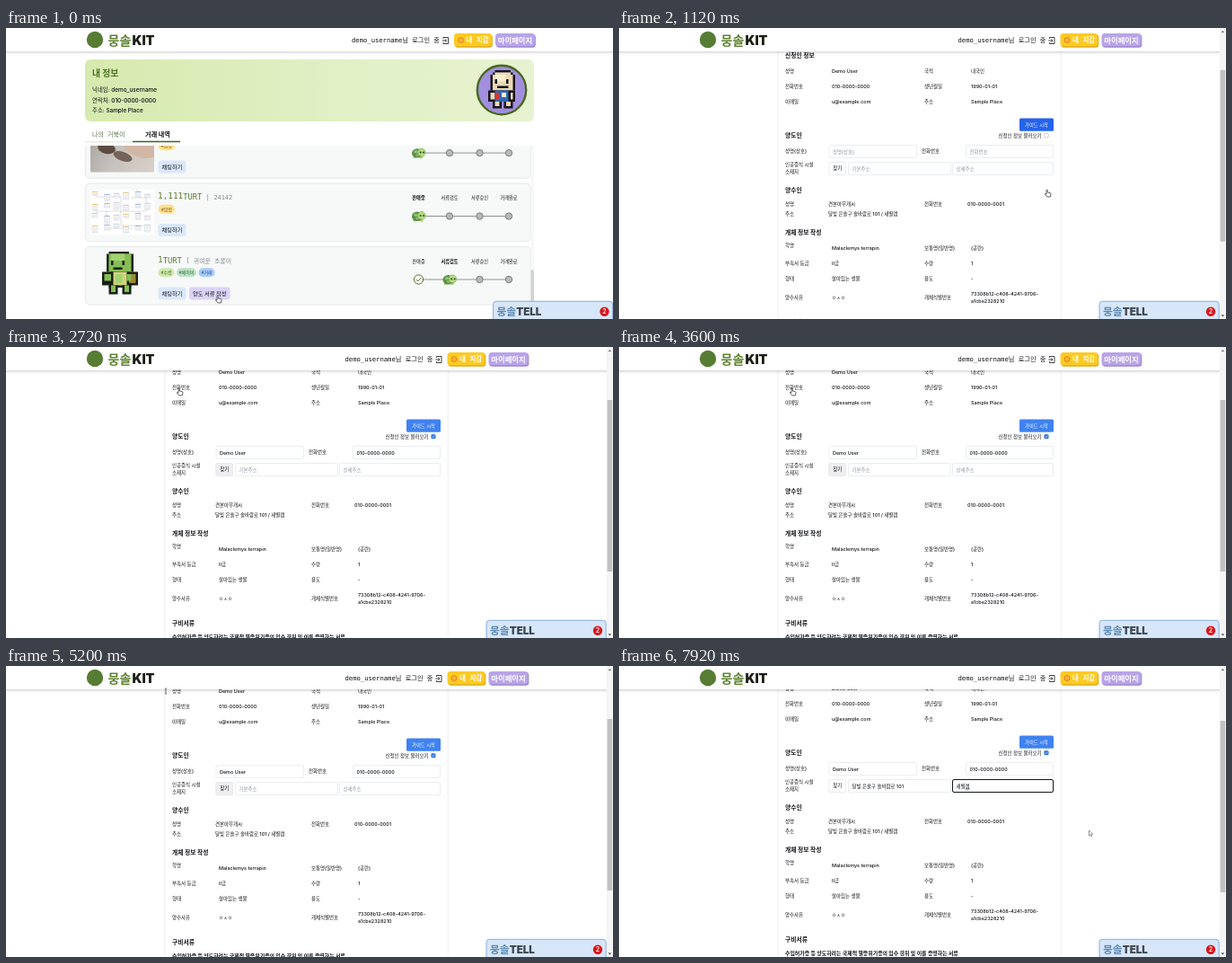
An HTML page with a canvas that plays this animation: 676 by 324 pixels, repeating every 8000 ms.

```html
<!DOCTYPE html>
<html lang="ko">
<head>
<meta charset="utf-8">
<style>
html, body { margin: 0; width: 100%; height: 100%; overflow: hidden; background: #fff; }
canvas { display: block; width: 676px; height: 324px; }
</style>
</head>
<body>
<canvas id="stage"></canvas>
<script>
const W = 676, H = 324, LOOP = 8000;
const canvas = document.getElementById('stage');
const ratio = window.devicePixelRatio || 1;
canvas.width = W * ratio;
canvas.height = H * ratio;
const c = canvas.getContext('2d');

const SANS = 'Inter, "Noto Sans CJK KR", "Noto Sans CJK", sans-serif';
const MONO = '"DejaVu Sans Mono", "Noto Sans CJK KR", "Noto Sans CJK", monospace';
const INK = '#101216', FAINT = '#8d949e', GREEN = '#486f20';

const USER = 'demo_username';
const PHONE = '010-0000-0000';
const PLACE = 'Sample Place';
const PERSON = 'Demo User';
const ADDRESS = '달빛 은솔구 솔바람로 101';
const CAMP = '새별캠';
const TYPED = ['', 'ㅅ', '새', '샙', '새벼', '새별', '새별ㅋ', '새별캐', CAMP];

// Drawing helpers
function box(x, y, w, h, fill, r = 0, stroke, line = 0.7) {
  c.beginPath();
  c.roundRect(x, y, w, h, r);
  if (fill) { c.fillStyle = fill; c.fill(); }
  if (stroke) { c.strokeStyle = stroke; c.lineWidth = line; c.stroke(); }
}
function oval(x, y, rx, ry, fill, turn = 0) {
  c.beginPath();
  c.ellipse(x, y, rx, ry, turn, 0, Math.PI * 2);
  c.fillStyle = fill;
  c.fill();
}
function disc(x, y, r, fill, stroke, line = 0.8) {
  c.beginPath();
  c.arc(x, y, r, 0, Math.PI * 2);
  if (fill) { c.fillStyle = fill; c.fill(); }
  if (stroke) { c.strokeStyle = stroke; c.lineWidth = line; c.stroke(); }
}
function path(points, stroke, line = 0.8, fill) {
  c.beginPath();
  points.forEach(([x, y], i) => i ? c.lineTo(x, y) : c.moveTo(x, y));
  if (fill) { c.closePath(); c.fillStyle = fill; c.fill(); }
  c.strokeStyle = stroke;
  c.lineWidth = line;
  c.stroke();
}
// y is the vertical middle of the glyphs
function text(s, x, y, size = 5.45, { color = INK, weight = 500, font = SANS, align = 'left' } = {}) {
  c.font = `${weight} ${size}px ${font}`;
  c.textAlign = align;
  c.fillStyle = color;
  c.fillText(s, x, y + size * 0.37);
  return c.measureText(s).width;
}
function pixels(x, y, unit, rects) {
  for (const [color, px, py, w, h] of rects) {
    c.fillStyle = color;
    c.fillRect(x + px * unit, y + py * unit, w * unit, h * unit);
  }
}

// Timing helpers
const ease = p => p * p * (3 - 2 * p);
function track(keys, t) {
  const i = keys.findIndex(k => k[0] > t);
  if (i < 0) return keys[keys.length - 1].slice(1);
  const a = keys[i - 1], b = keys[i];
  const p = ease((t - a[0]) / (b[0] - a[0]));
  return a.slice(1).map((v, n) => v + (b[n + 1] - v) * p);
}

const OPEN = 400, CHECK = 1430, FIND = 1800, FILL = 5720, FOCUS = 6720, TYPE = 6960;
const SCROLL = [[0, 0], [880, 0], [1090, 67], [1460, 67], [1620, 87], [7770, 87], [7900, 90]];
const MOUSE = [
  [0, 235, 298], [320, 235, 298], [760, 476, 180], [1160, 476, 180],
  [1360, 476, 119], [1640, 476, 119], [1840, 247.5, 136.5], [2080, 247.5, 136.5],
  [2640, 192, 46], [4240, 192, 46], [4720, 178, 28], [5600, 178, 28],
  [6400, 395, 115.5], [6500, 395, 115.5], [6660, 397, 136]
];
const SHAPES = [
  [400, 'hand'], [740, 'arrow'], [1200, 'hand'], [1340, 'arrow'], [1660, 'hand'], [1820, 'arrow'],
  [4400, 'hand'], [5640, 'beam'], [6320, 'arrow'], [7000, 'beam'], [7800, 'none'], [LOOP, 'arrow']
];

function drawCursor(t) {
  const shape = SHAPES.find(s => t < s[0])[1];
  const [x, y] = t < 7800 ? track(MOUSE, t) : [523.5, 183];
  c.save();
  c.translate(x, y);
  c.lineJoin = 'round';
  if (shape === 'arrow') {
    path([[0, 0], [0, 6], [1.4, 4.8], [2.3, 6.8], [3.2, 6.4], [2.4, 4.4], [4.2, 4.2], [0, 0]], '#333', 0.5, '#fff');
  } else if (shape === 'hand') {
    path([[0, 0.4], [0.6, 0], [1.2, 0.4], [1.3, 3], [4.6, 3.8], [5, 4.6], [4.4, 8], [1, 8],
      [-1.6, 5], [-1.2, 4.3], [0, 5], [0, 0.4]], '#222', 0.7, '#fff');
  } else if (shape === 'beam') {
    path([[-1.2, -3], [1.2, -3]], '#333', 0.6);
    path([[0, -3], [0, 3]], '#333', 0.7);
    path([[-1.2, 3], [1.2, 3]], '#333', 0.6);
  }
  c.restore();
}

// Shared parts
function button(x, w, fill, edge) {
  box(x + 0.8, 7, w, 14.8, edge, 3.5);
  box(x, 6, w, 14.6, fill, 3.5);
}
function drawHeader(right) {
  c.save();
  c.shadowColor = 'rgba(0,0,0,.22)';
  c.shadowBlur = 3 * ratio;
  c.shadowOffsetY = ratio;
  c.fillStyle = '#fff';
  c.fillRect(-8, -8, right + 16, 34);
  c.restore();
  disc(99, 13, 9.2, '#567d33');
  text('뭉솔', 113.5, 13.5, 14, { color: '#5d8130', weight: 900 });
  text('KIT', 140.5, 13.5, 14.4, { color: '#1c1f16', weight: 900 });

  c.save();
  c.translate(right - W, 0);
  text(USER + '님 로그인 중', 385, 13.5, 7.2, { font: MONO });
  path([[487, 12], [487, 10.5], [492.5, 10.5], [492.5, 17.5], [487, 17.5], [487, 16]], INK, 0.8);
  path([[485.8, 14], [490.5, 14]], INK, 0.8);
  path([[488.8, 12.5], [490.5, 14], [488.8, 15.5]], INK, 0.7);
  const style = { color: '#fff', weight: 800, font: MONO };
  button(499, 42, '#fcca24', '#d9a514');
  disc(506.5, 13.5, 2.8, '#f8b830', '#e88722', 1.1);
  text('내 지갑', 512.5, 13.5, 7.5, style);
  button(545, 44, '#b8a4e8', '#9680cb');
  text('마이페이지', 567, 13.5, 8.4, { ...style, align: 'center' });
  c.restore();
}
function drawChat(right) {
  const x = right - 133.5;
  box(x, 304.3, 133.2, 30, '#d7e6f8', 3.5, '#88aeda', 1);
  const w = text('뭉솔', x + 4, 315.5, 11.8, { color: '#5a88b0', weight: 900 });
  text('TELL', x + 4 + w, 315.5, 11.6, { color: '#3c4652', weight: 900 });
  disc(right - 9.5, 315.8, 5.2, '#d8161c');
  text('2', right - 9.5, 315.8, 7, { color: '#fff', weight: 600, align: 'center' });
}

// List page
function drawAvatar() {
  disc(552, 69, 27.2, '#a18fdd', '#47681f', 2.4);
  const dark = '#16151b', skin = '#ecd9b4', pale = '#f8ecd2';
  pixels(532, 47, 2.5, [
    [dark, 5, 0, 7, 1], [dark, 4, 1, 9, 1], [dark, 3, 2, 11, 7], [skin, 5, 1, 7, 1], [skin, 4, 2, 9, 7],
    [pale, 5, 2, 5, 3], [dark, 5, 4, 1, 2], [dark, 10, 4, 1, 2], [dark, 6, 7, 5, 1],
    [dark, 2, 9, 12, 5], [skin, 3, 10, 2, 3], [skin, 12, 10, 1, 3],
    ['#3068b8', 5, 9, 6, 5], ['#d5382e', 5, 10, 2, 3], [pale, 8, 10, 2, 2],
    [dark, 4, 14, 4, 3], [dark, 9, 14, 4, 3], [skin, 5, 14, 2, 2], [skin, 10, 14, 2, 2]
  ]);
}
function drawPet() {
  const dark = '#182016', skin = '#86bd54', light = '#a3d470', shell = '#9a8b35';
  pixels(107, 249, 2.5, [
    [dark, 3, 0, 9, 1], [dark, 2, 1, 12, 8], [skin, 3, 1, 10, 8], [light, 4, 1, 6, 3],
    [dark, 4, 4, 1, 2], [dark, 9, 4, 1, 2], [dark, 5, 7, 4, 1],
    [dark, 0, 9, 16, 6], [dark, 3, 14, 10, 2], [shell, 12, 10, 3, 4], [skin, 1, 10, 3, 3],
    [dark, 4, 9, 8, 7], ['#d3d47a', 5, 9, 6, 6], [light, 6, 10, 3, 4], [skin, 11, 10, 2, 3],
    [dark, 3, 15, 4, 4], [dark, 9, 15, 4, 4], [skin, 4, 15, 2, 3], [skin, 10, 15, 2, 3]
  ]);
}
function drawDiagram(x, y) {
  box(x, y, 71, 50, '#fff');
  const lines = '#a5acb6';
  path([[x + 5, y + 8], [x + 34, y + 8], [x + 34, y + 40], [x + 61, y + 40]], lines, 0.4);
  path([[x + 5, y + 24], [x + 62, y + 24], [x + 62, y + 9], [x + 45, y + 9]], lines, 0.4);
  path([[x + 18, y + 24], [x + 18, y + 43], [x + 47, y + 43]], lines, 0.4);
  const tints = ['#f0cf7c', '#a9bad6', '#d5dae1'];
  for (let i = 0; i < 24; i++) {
    const bx = x + 2 + (i % 6) * 11.5 + i * 5 % 3, by = y + 2 + Math.floor(i / 6) * 12 + i * 7 % 4;
    const h = 4 + i * 3 % 5;
    box(bx, by, 6, h, '#fcfcfd', 0, '#b1b7c0', 0.35);
    box(bx, by, 6, 1, tints[i % 3]);
    for (let j = 2.2; j < h; j += 1.5) path([[bx + 1, by + j], [bx + 5, by + j]], '#babfc7', 0.35);
  }
}
function drawPhoto() {
  const g = c.createLinearGradient(94, 125, 165, 160);
  g.addColorStop(0, '#aca7a2');
  g.addColorStop(0.45, '#c8c3be');
  g.addColorStop(1, '#d9d1c8');
  c.save();
  c.beginPath();
  c.roundRect(94, 110, 71, 50.5, 1);
  c.clip();
  box(94, 110, 71, 51, g);
  oval(150, 133, 20, 11, '#d3b7a5', 0.3);
  oval(112, 134, 10, 6, '#5d4b43', 0.2);
  oval(130, 143, 11, 5, '#75645a', 0.35);
  c.restore();
}
function turtleIcon(x, y) {
  oval(x - 4.5, y + 4.4, 2, 1.7, '#a5d46b');
  oval(x + 3, y + 4.6, 2, 1.7, '#a5d46b');
  oval(x - 1.5, y + 0.3, 6, 5.2, '#5d8f49');
  oval(x - 3, y - 1.3, 2.2, 1.8, '#94c277');
  oval(x - 1.5, y + 2.4, 1.7, 1.3, '#8ebc70');
  disc(x + 3.4, y - 0.6, 4.4, '#b2dc7b', '#6f9c48', 0.5);
  disc(x + 2.2, y - 0.6, 0.9, '#20291a');
  disc(x + 5.6, y - 0.6, 0.9, '#20291a');
}
function drawSteps(y, active) {
  const names = ['판매중', '서류검토', '서류승인', '거래완료'];
  path([[460, y], [560, y]], '#777', 0.8);
  names.forEach((name, i) => {
    const x = [459.5, 494, 527.5, 560][i];
    text(name, x, y - 20, 5.2, { weight: i === active ? 800 : 500, align: 'center' });
    if (i < active) {
      disc(x, y, 5.1, '#fff', GREEN, 1);
      path([[x - 2.4, y], [x - 0.6, y + 1.9], [x + 2.6, y - 1.9]], GREEN, 1);
    } else if (i === active) turtleIcon(x, y);
    else disc(x, y, 3.7, '#b9b9b9', '#747474', 0.9);
  });
}
function drawTags(y, tags) {
  let x = 169.5;
  for (const [label, w, fill, color] of tags) {
    box(x, y - 5, w, 10, fill, 5);
    text(label, x + w / 2, y, 5, { color, align: 'center', font: MONO });
    x += w + 2.5;
  }
}
function drawCard(y, price, name, tags, active) {
  box(88.4, y, 496, 64.6, '#f7f9f9', 5, '#dfe4e5', 0.8);
  if (price) {
    const olive = { color: '#587e2d', font: MONO };
    let x = 169 + text(price, 169, y + 14, 9.4, olive);
    x += text('TURT', x, y + 15, 8.8, olive);
    text('|', x + 6.5, y + 15.5, 6, { color: '#777', align: 'center' });
    text(name, x + 13, y + 15.5, 6.9, { color: '#85888c', font: MONO });
  }
  drawTags(y + 28.7, tags);
  box(169.5, y + 45, 31, 14, '#dbe8fb', 3);
  text('채팅하기', 185, y + 52, 6.2, { align: 'center' });
  drawSteps(y + 36.5, active);
}
function drawList() {
  const g = c.createLinearGradient(88, 0, 588, 0);
  g.addColorStop(0, '#d7eaae');
  g.addColorStop(0.5, '#e0efc3');
  g.addColorStop(1, '#e7f3d0');
  box(88, 35, 500, 69, g, 6);
  text('내 정보', 96, 50, 9.8, { color: GREEN, weight: 700 });
  ['닉네임: ' + USER, '연락처: ' + PHONE, '주소: ' + PLACE]
    .forEach((s, i) => text(s, 96, 69 + i * 11.5, 6.4));
  drawAvatar();

  text('나의 거북이', 96, 118.5, 7, { color: '#597048', font: MONO });
  text('거래 내역', 169, 118.5, 7.1, { weight: 700, align: 'center' });
  path([[88, 126.8], [141, 126.8]], '#d4dccb', 0.8);
  path([[141, 126.6], [194, 126.6]], '#3e6420', 1.5);

  c.save();
  c.beginPath();
  c.rect(86, 131, 504, 178);
  c.clip();
  const female = [['#암컷', 18.5, '#ffe08e', '#775b16']];
  drawCard(102.6, '', '', female, 0);
  drawPhoto();
  drawCard(173, '1,111', '24142', female, 0);
  drawDiagram(94, 180);
  drawCard(243.5, '1', '귀여운 초롱이', [
    ['#수컷', 18, '#cfe9ad', '#3f6b25'], ['#베이비', 22, '#bde4c4', '#316a47'], ['#거래', 18, '#a9cbfa', '#24569a']
  ], 1);
  drawPet();
  box(204, 288.5, 45.5, 14, '#dcd3f5', 3);
  text('양도 서류 작성', 226.7, 295.5, 6.2, { align: 'center' });
  box(584.5, 131, 3.5, 177, '#f8f8f8');
  box(584.5, 269, 3.5, 36, '#d2d4d4', 1.5);
  c.restore();
  drawHeader(W);
  drawChat(W);
}

// Form page
function field(x, y, w, value, hint) {
  box(x, y, w, 14, '#fff', 1.5, '#e3e6ea', 0.7);
  text(value || hint, x + 4, y + 7.1, 5.45, { color: value ? INK : FAINT });
}
function drawDetail(t) {
  const x = 371.5, y = 149.5, focused = t >= FOCUS;
  const step = Math.floor((t - TYPE) / 90) + 1;
  const typed = TYPED[Math.max(0, Math.min(TYPED.length - 1, step))];
  field(x, y, 112, typed, '상세주소');
  if (!focused) return;
  box(x, y, 112, 14, null, 1.5, '#15171b', 1);
  c.textAlign = 'left';
  const end = x + 4 + c.measureText(typed).width;
  if (typed) {
    const from = x + 4 + c.measureText(typed.slice(0, -1)).width;
    path([[from, 160], [end, 160]], INK, 0.5);
  } else path([[x + 4, 153], [x + 4, 160]], INK, 0.5);
}
function drawForm(t) {
  const [scroll] = track(SCROLL, t);
  const checked = t >= CHECK, filled = t >= FILL;
  c.save();
  c.translate(0, 67 - scroll);
  box(176.8, -22, 315.4, 480, '#fff', 3, '#e9ebee', 0.8);

  const heads = [['신청인 정보', 31], ['양도인', 119.3], ['양수인', 181], ['개체 정보 작성', 227.3], ['구비서류', 327.5]];
  heads.forEach(([s, y]) => text(s, 185, y, 6.75, { weight: 700 }));

  const rows = [
    [48, '성명', PERSON, '국적', '내국인'],
    [65, '전화번호', PHONE, '생년월일', '1990-01-01'],
    [82, '이메일', 'u@example.com', '주소', PLACE],
    [261.8, '부속서 등급', 'II급', '수량', '1'],
    [278.8, '형태', '살아있는 생물', '용도', '-']
  ];
  for (const [y, ...cells] of rows) {
    cells.forEach((s, i) => text(s, [185, 237, 340, 392][i], y));
  }

  const hover = t > 720 && t < 1240;
  box(446, 100.5, 38, 14.3, hover ? '#2563eb' : '#3f82f0', 1.5);
  text('가이드 시작', 465, 107.6, 5.3, { color: '#fff', align: 'center' });
  text('신청인 정보 불러오기', 470.5, 119.6, 5.45, { align: 'right' });
  box(473.7, 117.4, 4.5, 4.5, checked ? '#2672e8' : '#fff', 0.8, checked ? '#2672e8' : '#a9a3a3', 0.5);
  if (checked) path([[474.7, 119.7], [475.6, 120.7], [477.3, 118.5]], '#fff', 0.7);

  text('성명(상호)', 185, 137.3);
  field(234, 130.5, 97.5, checked && PERSON, '성명(상호)');
  text('전화번호', 337, 137.3);
  field(386.5, 130.5, 97, checked && PHONE, '전화번호');
  text('인공증식 시설', 185, 152);
  text('소재지', 185, 160.2);
  const pressed = t >= FIND && !filled;
  box(233.8, 149.5, 18.8, 14, pressed ? '#efeff2' : '#fff', 1.5, '#dfe2e6', 0.7);
  text('찾기', 243.2, 156.4, 5.5, { align: 'center' });
  field(255.5, 149.5, 114, filled && ADDRESS, '기본주소');
  drawDetail(t);

  text('성명', 185, 195.5);
  text('견본아무개씨', 233, 195.5);
  text('전화번호', 340, 195.5);
  text('010-0000-0001', 388, 195.5);
  text('주소', 185, 207);
  text(`${ADDRESS} / ${CAMP}`, 233, 207);

  text('학명', 185, 242.3);
  text('Malaclemys terrapin', 237, 245);
  text('보통명(일반명)', 340, 245);
  text('(공란)', 392, 245);
  text('양수사유', 185, 300);
  text('ㅇㅅㅇ', 237, 300);
  text('개체식별번호', 340, 300);
  text('73308b12-c408-4241-9706-', 392, 295.8);
  text('a1cbe2328210', 392, 304.3);
  text('수입허가증 등 양도하려는 국제적 멸종위기종의 입수 경위 및 이를 증명하는 서류', 185, 342.5, 5.9, { weight: 700 });
  c.restore();

  drawHeader(668.5);
  drawChat(668.5);
  box(669, 0, 7, H, '#f4f4f4');
  box(669.6, 6 + scroll * 0.61, 5.6, 191, '#c1c1c1');
  path([[670.8, 5], [672.4, 3], [674, 5]], '#777', 0.2, '#777');
  path([[670.8, 319.5], [672.4, 321.5], [674, 319.5]], '#555', 0.2, '#555');
}

function draw(t) {
  c.setTransform(ratio, 0, 0, ratio, 0, 0);
  c.fillStyle = '#fff';
  c.fillRect(0, 0, W, H);
  if (t < OPEN) drawList();
  else drawForm(t);
  drawCursor(t);
}

const start = performance.now();
function tick() {
  draw((performance.now() - start) % LOOP);
  requestAnimationFrame(tick);
}
tick();
</script>
</body>
</html>
```
